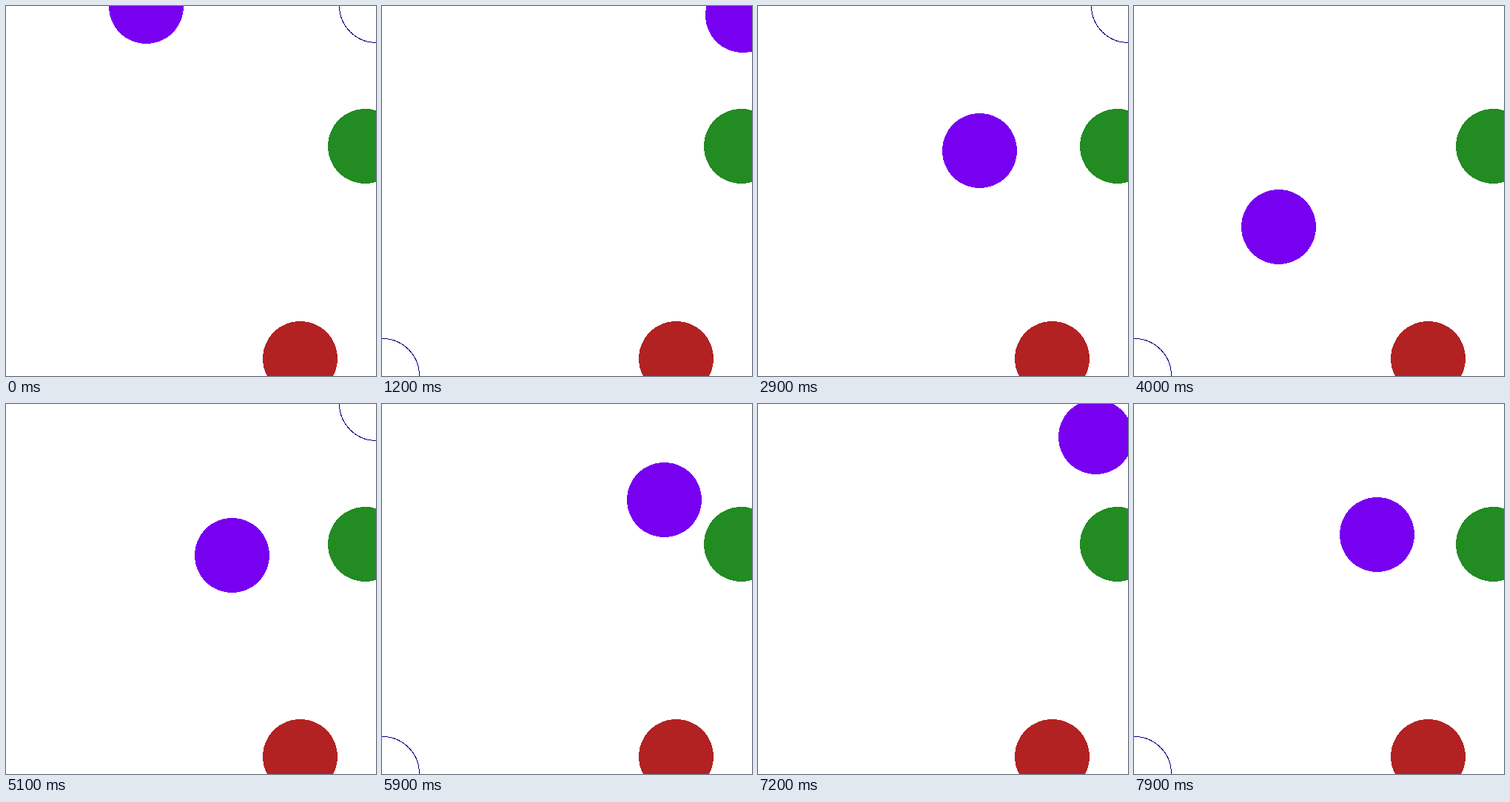
An HTML page for the animation above (8 s loop, 500 px wide and 500 px high).

```html
<!DOCTYPE html>
<html>
<head>
<meta charset="utf-8">
<style>
  html, body { margin: 0; width: 100%; height: 100%; overflow: hidden; background: #fff; }
  svg { display: block; shape-rendering: crispEdges; }
</style>
</head>
<body>
<svg width="500" height="500">
  <circle id="goal" r="50" fill="none" stroke="#000080"/>
  <circle cx="485.5" cy="189.5" r="50.5" fill="#228b22"/>
  <circle cx="397.5" cy="476.5" r="50.5" fill="#b22222"/>
  <circle id="chaser" r="50.5" fill="#7800f0"/>
</svg>
<script>
const LOOP = 8000, STEP = 100;
const goal = document.getElementById('goal');
const chaser = document.getElementById('chaser');

// Where the chaser turns around; at each turn the goal changes corner.
const turns = [
  { t: 0, x: 189, y: 0 },
  { t: 1075, x: 500, y: 0 },
  { t: 2280, x: 18, y: 492 },
  { t: 3380, x: 488, y: -3 },
  { t: 4480, x: 0, y: 500 },
  { t: 5580, x: 510, y: 7 },
  { t: 6300, x: 200, y: 303 },
  { t: 7500, x: 500, y: 0 },
  { t: 8505, x: 0, y: 515 }
];

const ease = p => (1 - Math.cos(Math.PI * p)) / 2;
const mix = (a, b, k) => Math.floor(a + (b - a) * k) + 0.5;

function place(circle, x, y) {
  circle.setAttribute('cx', x);
  circle.setAttribute('cy', y);
}

function draw(time) {
  const t = Math.floor(time % LOOP / STEP) * STEP;
  const leg = turns.findLastIndex(turn => turn.t <= t);
  const a = turns[leg], b = turns[leg + 1];
  const k = ease((t - a.t) / (b.t - a.t));

  place(chaser, mix(a.x, b.x, k), mix(a.y, b.y, k));
  if (leg % 2) place(goal, 0.5, 499.5);
  else place(goal, 500.5, -0.5);
}

const begin = performance.now();
function tick() {
  draw(performance.now() - begin);
  requestAnimationFrame(tick);
}
tick();
</script>
</body>
</html>
```
